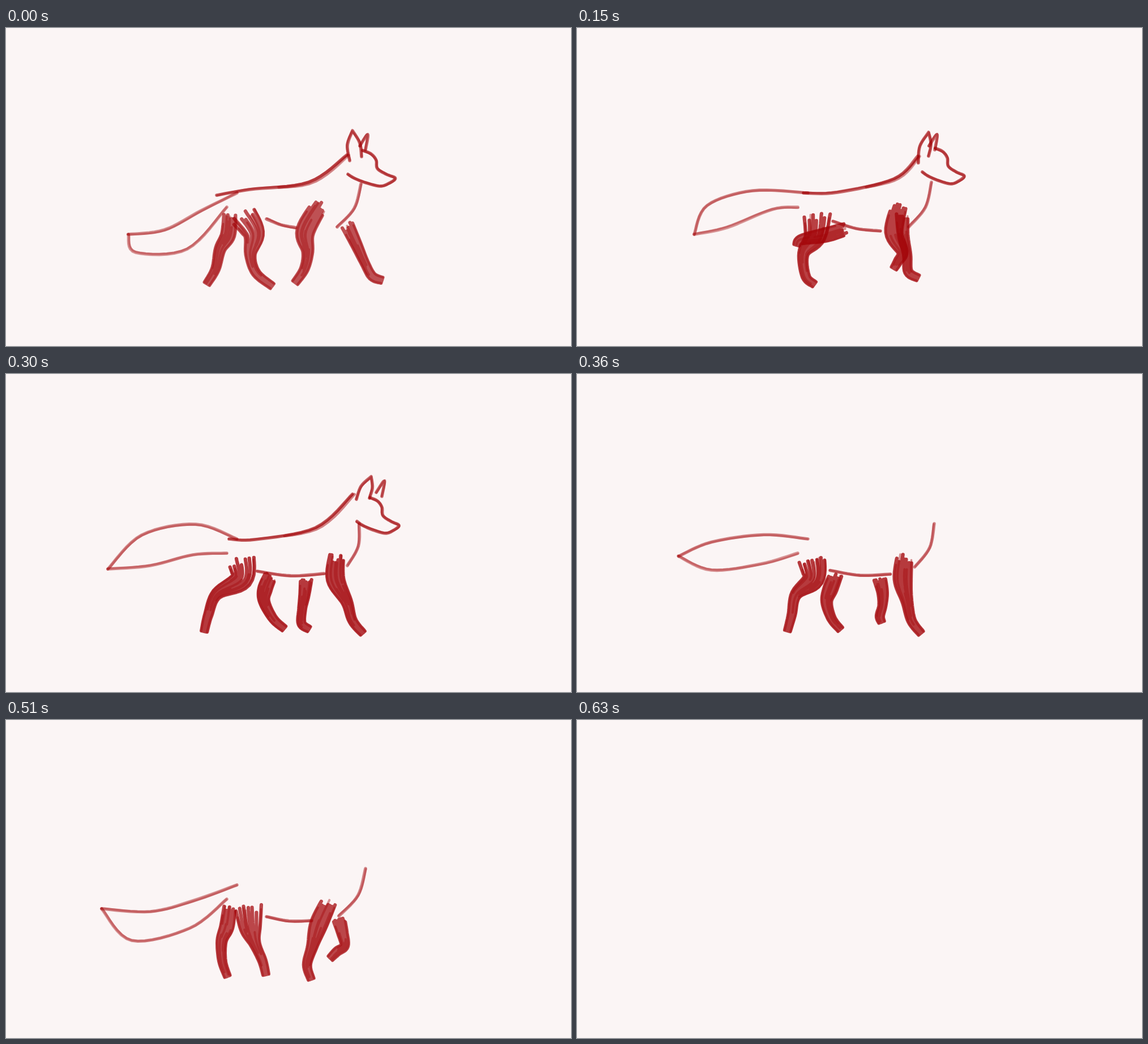
Write an HTML page that moves like this. It is 998 by 561 pixels and loops after 0.72 s.

```html
<!DOCTYPE html>
<html lang="en">
<head>
<meta charset="utf-8">
<title>Walk cycle sketch</title>
<style>
html, body { margin: 0; width: 100%; height: 100%; overflow: hidden; background: #fbf5f5; }
svg { display: block; width: 100vw; height: 100vh; }
path { fill: none; stroke: #a30509; stroke-linecap: round; stroke-linejoin: round; }
</style>
</head>
<body>
<svg id="stage" viewBox="0 0 998 561"></svg>
<script>
const STEP = 30, COUNT = 24, DRAWN = 21, HEAD_END = 12;

// Joints from hip or shoulder to toe at the key drawings; girth is half the width at each joint.
const legs = [
  { girth: [13, 14, 11, 9, 8], keys: {
    0: '395,330 392,365 378,390 370,425 355,451',
    5: '474,355 440,365 402,372 391,376 388,383',
    8: '456,352 447,378 445,398 457,425 463,450',
    10: '467,355 457,380 456,402 472,432 491,449',
    14: '448,352 438,378 426,402 427,430 439,452',
    17: '395,330 390,365 381,390 382,425 391,452' } },
  { girth: [13, 11, 9, 9, 8], keys: {
    0: '602,346 618,380 634,415 647,438 664,445',
    5: '574,325 576,365 583,400 585,430 602,441',
    8: '547,360 544,385 536,415 532,440 543,450',
    10: '530,362 527,390 523,415 522,440 535,450',
    14: '540,362 553,382 556,402 548,414 541,425',
    17: '588,352 594,375 598,398 585,408 573,420' } },
  { girth: [26, 20, 11, 9, 8], keys: {
    0: '417,327 438,362 432,400 442,432 470,455',
    5: '424,327 420,368 400,398 404,438 419,452',
    8: '413,326 408,368 378,395 367,430 371,452',
    10: '414,325 415,362 372,388 357,425 350,454',
    14: '417,327 420,362 402,390 402,425 394,452',
    17: '428,328 432,368 440,395 453,425 459,449' } },
  { girth: [15, 17, 11, 9, 8], keys: {
    0: '557,308 529,358 533,395 527,425 511,449',
    5: '570,312 560,360 575,395 567,412 560,424',
    8: '578,318 578,360 597,400 605,425 609,449',
    10: '584,320 582,362 602,402 612,435 630,457',
    14: '574,318 569,362 564,400 570,435 585,457',
    17: '572,318 553,360 541,400 532,432 539,457' } }
];

// Two points along the top of the tail, the tip, two points along the bottom
const tail = track({
  0: '345,322 280,356 216,364 229,396 320,390',
  5: '310,287 230,313 207,364 265,352 345,320',
  8: '320,253 225,287 196,376 240,332 320,310',
  10: '335,265 240,284 180,344 255,338 330,319',
  14: '325,302 235,309 179,299 220,354 320,351',
  17: '330,319 255,338 169,333 222,389 325,367',
  20: '335,326 250,364 163,366 225,414 335,376'
}, true);

// Throat, breast, then both ends of the belly
const trunk = track({
  0: '627,275 585,351 460,337 512,352',
  5: '626,272 586,351 452,341 536,358',
  8: '628,264 597,343 447,347 552,355',
  10: '624,264 603,338 444,348 562,352',
  14: '638,264 590,343 450,345 545,354',
  17: '635,262 588,346 460,347 540,354'
}, true);

const spine = track({
  0: '372,295 430,285 535,272 602,224',
  5: '400,291 460,290 560,266 602,226',
  8: '402,288 435,293 550,276 615,217',
  10: '394,291 440,292 547,271 612,212'
});

// Brow notch, near ear (left, tip, right), far ear tip
const skull = track({
  0: '656,248 607,234 612,181 628,227 639,188',
  5: '656,244 603,238 621,184 621,226 636,188',
  8: '665,242 616,242 629,185 634,222 653,188',
  10: '666,250 619,221 645,181 642,219 668,189'
});
const profile = points('-23,-32 -10,-26 -2,-15 0,0 14,10 28,17 18,26 4,31 -18,25 -36,17 -46,10');
const farEar = points('-14,20 0,0 -4,27');

const svg = document.getElementById('stage');
const mix = (a, b, t) => a + (b - a) * t;
const blend = (a, b, t) => a.map((v, j) => mix(v, b[j], t));
const toPath = pts => 'M' + pts.map(p => p[0].toFixed(1) + ' ' + p[1].toFixed(1)).join('L');

function points(text) {
  return text.split(' ').map(p => p.split(',').map(Number));
}

function track(keys, loops) {
  const list = Object.entries(keys).map(([at, text]) => ({ at: +at, pts: points(text) }));
  if (loops) list.push({ at: COUNT, pts: list[0].pts });
  return list;
}

function sample(list, n) {
  const i = list.findIndex(k => k.at > n);
  if (i < 0) return list[list.length - 1].pts;
  const a = list[i - 1], b = list[i];
  return a.pts.map((p, k) => blend(p, b.pts[k], (n - a.at) / (b.at - a.at)));
}

function random(seed) {
  let s = seed * 7919 + 17;
  return () => (s = (s * 16807 + 11) % 2147483647) / 2147483647;
}

// Smooth curve through points of any dimension
function curve(pts) {
  const out = [];
  for (let i = 0; i < pts.length - 1; i++) {
    const a = pts[i - 1] || pts[i], b = pts[i], c = pts[i + 1], d = pts[i + 2] || c;
    for (let k = 0; k < 8; k++) {
      const t = k / 8;
      out.push(b.map((v, j) => v + t / 2 * (c[j] - a[j] +
        t * (2 * a[j] - 5 * v + 4 * c[j] - d[j] + t * (3 * (v - c[j]) + d[j] - a[j])))));
    }
  }
  return [...out, pts[pts.length - 1]];
}

// Line from a to b, bowed sideways by a share of its length
function bow(a, b, share) {
  const mid = blend(a, b, .5);
  return curve([a, [mid[0] + (a[1] - b[1]) * share, mid[1] + (b[0] - a[0]) * share], b]);
}

function add(width) {
  const p = document.createElementNS('http://www.w3.org/2000/svg', 'path');
  p.setAttribute('stroke-width', width);
  svg.append(p);
  return p;
}

function show(p, d, alpha) {
  p.setAttribute('d', d);
  p.setAttribute('opacity', alpha);
}

// A retraced line wanders slightly off the first one
function wander(pts, rnd) {
  const a = rnd() * 6, b = rnd() * 6, size = .5 + rnd();
  return pts.map((p, i) => [p[0] + size * Math.sin(i / 5 + a), p[1] + size * Math.sin(i / 6 + b)]);
}

// Brush stroke along a limb; side runs from -1 to 1 across it
function brush(limb, side, from, to) {
  return toPath(limb.map(([x, y, w], i) => {
    const a = limb[Math.max(i - 1, 0)], b = limb[Math.min(i + 1, limb.length - 1)];
    const dx = b[0] - a[0], dy = b[1] - a[1], off = side * (w - 3) / (Math.hypot(dx, dy) || 1);
    return [x - dy * off, y + dx * off];
  }).slice(from, to));
}

const limbs = legs.map(({ girth, keys }) =>
  ({ girth, keys: track(keys, true), base: add(6.2), dark: add(4), edge: add(3.5) }));
const lines = Array.from({ length: 9 }, () => ({ halo: add(5.6), core: add(3.8) }));

function drawLimb(limb, n, rnd) {
  const pts = curve(sample(limb.keys, n).map((p, i) => [...p, limb.girth[i]]));
  const end = pts.length, strokes = 7;
  let base = '', dark = '';
  for (let k = 0; k < strokes; k++) {
    const side = 2 * k / (strokes - 1) - 1;
    base += brush(pts, side + .12 * (rnd() - .5), Math.floor(rnd() * 4), end);
    const from = Math.floor(rnd() * 16);
    dark += brush(pts, 1.6 * rnd() - .8, from, from + 8 + Math.floor(rnd() * 12));
  }
  show(limb.base, base, .68 + .1 * Math.sin(Math.PI * n / 20));
  show(limb.dark, dark, .4);
  show(limb.edge, brush(pts, -1, 2, end) + brush(pts, 1, 4, end), .45);
}

function outline(n) {
  const [t1, t2, tip, l1, l2] = sample(tail, n), [throat, breast, b1, b2] = sample(trunk, n);
  const list = [
    [.55, curve([[408, 291], t1, t2, tip])],
    [.52, curve([tip, l1, l2, [390, 316]])],
    [.58, bow(throat, breast, -.12)],
    [.65, bow(b1, b2, .05)]
  ];
  if (n >= HEAD_END) return list;
  const [notch, left, top, right, far] = sample(skull, n), back = curve(sample(spine, n));
  const stretch = 1 + .13 * Math.max(0, 1 - n / 5);
  return list.concat([
    [.75, back],
    [.4, back.slice(12).map(([x, y], i) => [x + i / 4, y + 3 * Math.sin(i / 4)])],
    [.75, [...bow(left, top, -.12), ...bow(top, right, -.1)]],
    [.7, curve(farEar.map(p => [p[0] + far[0], p[1] + far[1]]))],
    [.78, curve(profile.map(p => [p[0] * stretch + notch[0], p[1] + notch[1]]))]
  ]);
}

function draw(n) {
  svg.style.visibility = n < DRAWN ? 'visible' : 'hidden';
  if (n >= DRAWN) return;
  limbs.forEach((limb, i) => drawLimb(limb, n, random(n * 31 + i * 5 + 3)));
  const list = outline(n);
  lines.forEach((line, i) => {
    const [tone, pts] = list[i] || [0, []];
    show(line.halo, pts.length ? toPath(pts) : '', tone * .8);
    show(line.core, pts.length ? toPath(wander(pts, random(n * 17 + i + 1))) : '', tone * .6);
  });
}

const start = performance.now();
let last = -1;
function tick() {
  const n = Math.floor((performance.now() - start) / STEP) % COUNT;
  if (n !== last) draw(last = n);
  requestAnimationFrame(tick);
}
tick();
</script>
</body>
</html>
```
